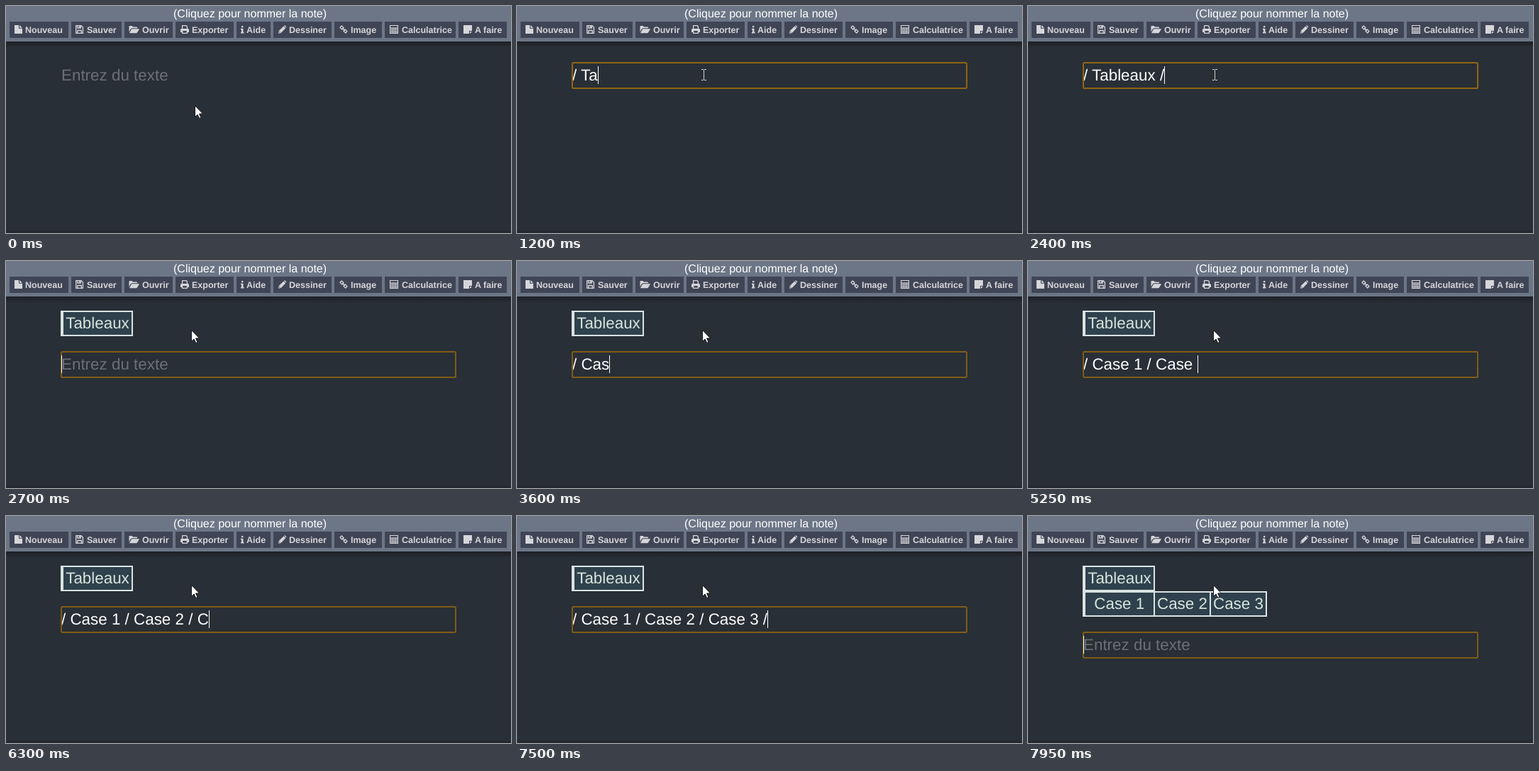
Animation of 712x320 px, one loop 8 s. Source, as an HTML page:

```html
<!DOCTYPE html>
<html lang="fr">
<meta charset="utf-8">
<title>Notes</title>
<style>
html, body { margin: 0; height: 100%; overflow: hidden; background: #292f36; }
svg { display: block; width: 712px; height: 320px; }
text { font: 22.4px "Liberation Sans", Arial, sans-serif; white-space: pre; text-rendering: geometricPrecision; fill: #fff; }
#title { font-size: 16px; }
#menu rect { fill: #404556; }
#menu text { font-size: 12.5px; font-weight: bold; fill: #d5d6d9; }
#menu .fill { fill: #d5d6d9; fill-rule: evenodd; }
#menu .line { fill: none; stroke: #d5d6d9; stroke-width: 1.3; stroke-linejoin: round; }
.cells path { fill: #2f414d; stroke: #d9e3e3; stroke-width: 2; }
.cells text { fill: #d9e5dc; }
#ring { fill: none; stroke-width: 2; }
</style>
<svg viewBox="0 0 712 320">
  <defs>
    <linearGradient id="shade" x2="0" y2="1">
      <stop stop-opacity=".32"/><stop offset="1" stop-opacity="0"/>
    </linearGradient>
  </defs>
  <rect width="712" height="320" fill="#292f36"/>
  <rect y="50" width="712" height="9" fill="url(#shade)"/>
  <rect y="317" width="712" height="3" opacity=".12"/>
  <rect width="712" height="50" fill="#6c7686"/>
  <text id="title" x="236" y="16">(Cliquez pour nommer la note)</text>
  <g id="menu"></g>
  <g class="cells" id="head">
    <path d="M78 71H178V105H78Z"/><path d="M80 71V105"/>
    <text x="84.2" y="95">Tableaux</text>
  </g>
  <g class="cells" id="body">
    <path d="M78 107H336V141H78ZM178 107V141M257 107V141"/><path d="M80 107V141"/>
    <text x="93.3" y="131">Case 1</text>
    <text x="182" y="131">Case 2</text>
    <text x="261" y="131">Case 3</text>
  </g>
  <g id="field">
    <text id="entry" x="78" y="105"></text>
    <rect id="ring" x="78" y="80" width="556" height="36" rx="1.5"/>
    <rect id="caret" y="85" width="1" height="25" fill="#fff"/>
  </g>
  <path id="arrow" d="M.5 .5V16.5L4 13L6.8 18.5L9 17.5L6.5 12H11.5Z" fill="#fff" stroke="#15181c"/>
  <path id="beam" d="M260 89.5H263M264 89.5H267M263.5 90V104M260 104.5H263M264 104.5H267" fill="none" stroke="#d0d2d4"/>
</svg>
<script>
const $ = id => document.getElementById(id);

// Calculator key holes
let keys = "";
for (let y = 4.8; y < 11; y += 2.3)
  for (let x = 1.1; x < 10; x += 2.7) keys += `M${x} ${y}h1.7v1.4h-1.7z`;

// left, right, icon x, text x, label, filled path, stroked path
const buttons = [
  [5, 88, 12, 27, "Nouveau", "M0 0H6V4.7H11V12H0ZM7 0L11 3.7H7Z", ""],
  [92, 163, 98, 114, "Sauver", "M5 1H6.6V3.5H5Z", "M.7 .7H8L10.4 3V11.3H.7ZM2.8 11V7.5H8.3V11M2.8 1V4H7.3V1"],
  [167, 235, 173.5, 192, "Ouvrir", "M0 9.5V2Q0 1 1 1H4L5.5 2.5H10.5Q11.7 2.5 11.7 4.2H4.5Q3 4.2 2 5.8ZM.4 11.2L3 6.5Q3.8 5.2 5 5.2H14.6L11.8 10Q11 11.2 10 11.2Z", ""],
  [239, 321, 246, 262, "Exporter", "M0 10V6.5Q0 5 1.5 5H10.5Q12 5 12 6.5V10H10V8H2V10Z", "M2.6 5V.7H8L9.4 2V5M2.6 8V11.3H9.4V8"],
  [325, 373, 331, 339, "Aide", "M1 1H3.3V3.3H1ZM0 4.8H3.4V9.8H4.5V11.4H0V9.8H1V6.4H0Z", ""],
  [377, 459, 384, 399, "Dessiner", "M0 11.7L.8 8L7.4 1.5L10.2 4.2L3.6 10.9ZM8 .9Q9 -.1 9.8 .7L11 1.9Q11.8 2.7 10.8 3.6ZM1.6 8.8L1.2 10.5L2.9 10.1Z", ""],
  [463, 530, 470, 486, "Image", "", "M3.2 1L6 3.8L3.8 6L1 3.2ZM8.2 6L11 8.8L8.8 11L6 8.2ZM4.3 4.3L7.7 7.7"],
  [534, 634, 541, 558, "Calculatrice", "M0 0H12V12H0ZM1.1 1.1V3.6H10.9V1.1Z" + keys, ""],
  [638, 706, 645, 661, "A faire", "M0 0H12V8H8V12H0ZM9 9H12L9 12Z", ""]
];
$("menu").innerHTML = buttons.map(([left, right, icon, x, label, fill, line]) => `
  <rect x="${left}" y="22" width="${right - left}" height="23"/>
  <g transform="translate(${icon} 27)"><path class="fill" d="${fill}"/><path class="line" d="${line}"/></g>
  <text x="${x}" y="38">${label}</text>`).join("");

const LOOP = 8000, TICK = 150;
const lines = ["/ Tableaux /", "/ Case 1 / Case 2 / Case 3 /", ""];
const rowShift = [0, 48, 84];
// Typing bursts: start time, row, letters shown after each tick
const bursts = [
  [0, 0, [0]],
  [750, 0, [1, 2, 3, 4, 5, 6, 7, 8, 9, 11]],
  [2400, 0, [12]],
  [2700, 1, [0]],
  [3000, 1, [1]],
  [3300, 1, [2, 4, 5, 6, 7, 8, 9]],
  [4500, 1, [10, 11, 12, 13, 15, 16]],
  [5550, 1, [17, 18, 20]],
  [6300, 1, [21, 22, 24, 25]],
  [7050, 1, [26, 27]],
  [7500, 1, [28]],
  [7800, 2, [0]]
];
const show = (id, on) => $(id).style.display = on ? "" : "none";
const move = (id, x, y) => $(id).setAttribute("transform", `translate(${x} ${y})`);

function draw(t) {
  const [start, row, counts] = bursts.findLast(b => b[0] <= t);
  const count = counts[Math.min(counts.length - 1, Math.floor((t - start) / TICK))];
  const entry = $("entry");
  entry.textContent = count ? lines[row].slice(0, count) : "Entrez du texte";
  entry.style.fill = count ? "#fff" : "#6b7076";
  const width = count ? entry.getComputedTextLength() : 0;
  $("caret").setAttribute("x", Math.round(78 + width));
  move("field", 0, rowShift[row]);

  const hover = t >= 150 && t < 2700;
  $("ring").style.stroke = hover ? "#8f6514" : "#7f5c17";
  show("ring", t >= 300);
  show("caret", t >= 300 && !(t >= 600 && t < 750) && !(t >= 7800 && t < 7950));
  show("head", row > 0);
  show("body", row > 1);
  show("beam", hover);
  show("arrow", !hover);
  move("arrow", ...(t < 150 ? [266, 140] : [261, 97]));
}

function frame() {
  draw(performance.now() % LOOP);
  requestAnimationFrame(frame);
}
frame();
</script>
</html>
```
